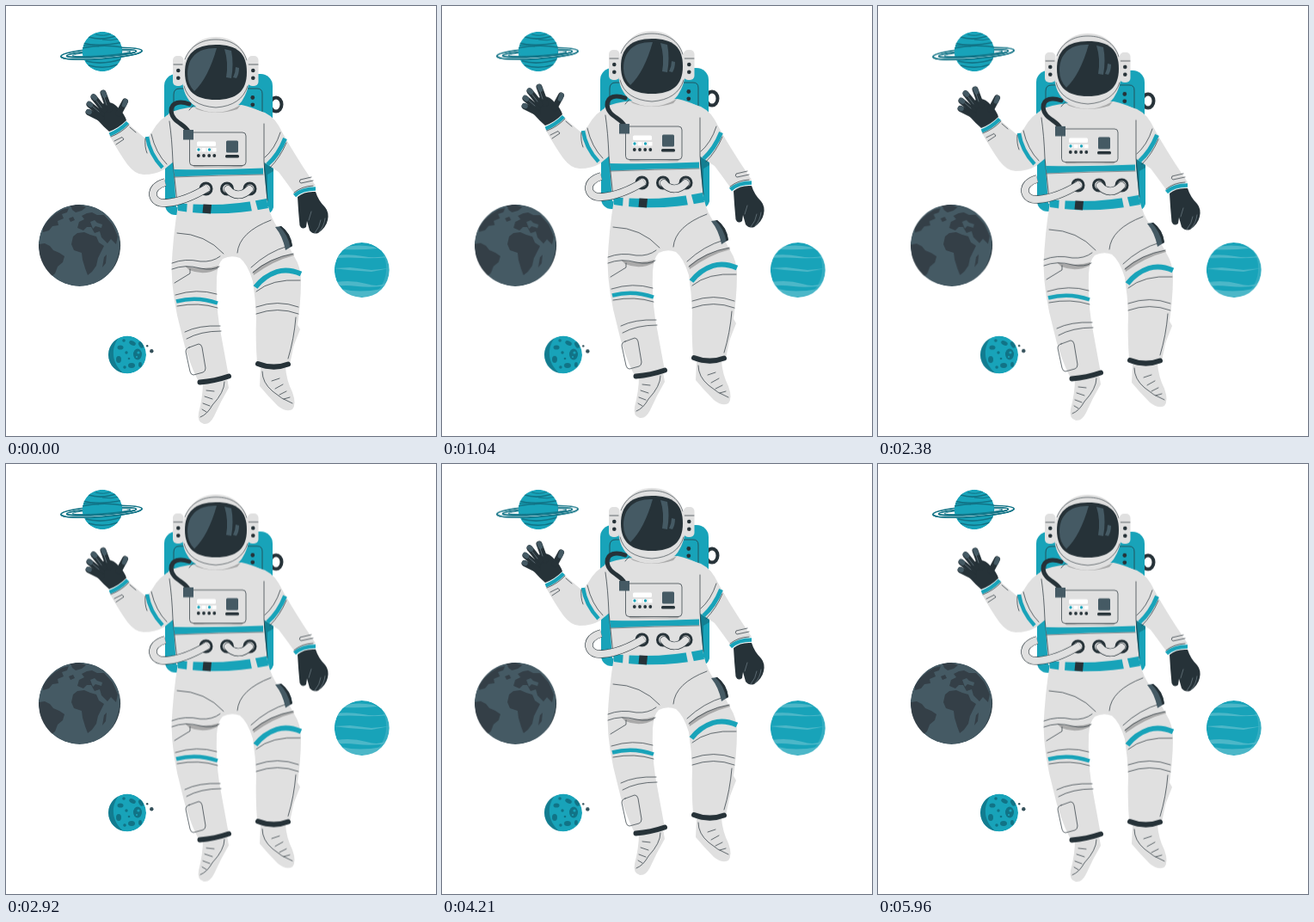
These frames come from a looping animation (500x500 px, 6 s). An HTML page:

```html
<!DOCTYPE html>
<html lang="en">
<head>
<meta charset="utf-8">
<title>Floating astronaut</title>
<style>
  html, body { margin: 0; width: 100%; height: 100%; overflow: hidden; background: #fff; }
  svg { display: block; width: 100%; height: 100%; }
  .float { animation: float 3s linear infinite; }
  .sway { transform-box: fill-box; transform-origin: center; animation: sway 3s ease-in-out infinite; }
  @keyframes float { 50% { transform: translateY(-10px); } }
  @keyframes sway { 25% { transform: rotate(.6deg); } 75% { transform: rotate(-.6deg); } }
  .suit { fill: #e0e0e0; }
  .dark { fill: #263238; }
  .slate { fill: #455a64; }
  .teal { fill: #18a3b9; }
  .deep { fill: #117386; }
  .shade { fill: #a9a9a9; }
  .line, .band, .hose { fill: none; stroke-linecap: round; stroke-linejoin: round; }
  .line { stroke: #263238; stroke-width: .7; }
  .band { stroke: #18a3b9; stroke-width: 4.5; stroke-linecap: butt; }
  .hose { stroke: #263238; stroke-width: 5; }
</style>
</head>
<body>
<svg viewBox="0 0 500 500">
  <defs>
    <clipPath id="ringBall"><circle cx="112" cy="53" r="23.3"/></clipPath>
    <clipPath id="earthBall"><circle cx="85.5" cy="278.3" r="47.6"/></clipPath>
    <clipPath id="gasBall"><circle cx="413.8" cy="307" r="32"/></clipPath>
    <clipPath id="moonBall"><circle cx="141" cy="405.5" r="22"/></clipPath>
    <clipPath id="front"><rect x="-50" y="0" width="100" height="10"/></clipPath>
    <g id="ring" fill="none" stroke="#117386">
      <ellipse rx="47.3" ry="6" stroke-width="1.7"/>
      <ellipse rx="44" ry="4.6" stroke="#fff" stroke-width="1"/>
      <ellipse rx="40.500" ry="3.700" stroke-width="1.800"/>
      <ellipse rx="34" ry="2.400" stroke-width=".8"/>
    </g>
  </defs>

  <!-- ringed planet -->
  <g class="sway">
    <g transform="translate(111 55.300) rotate(-4)"><use href="#ring"/></g>
    <g clip-path="url(#ringBall)">
      <circle class="teal" cx="112" cy="53" r="23.3"/>
      <g fill="none" stroke="#117386" stroke-width="1.600">
        <path d="M96 36Q112 41 130 34M89 43Q108 48 136 42M88 49Q112 44 136 48M93 64Q112 69 134 62M96 69Q114 74 130 68"/>
        <path d="M104 33Q114 36 122 32M90 46Q100 45 108 47M112 39Q122 41 132 38" stroke-width="1"/>
      </g>
      <path d="M130 34Q140 52 128 72L140 70V36Z" fill="#117386" opacity=".35"/>
    </g>
    <g transform="translate(111 55.300) rotate(-4)"><use href="#ring" clip-path="url(#front)"/></g>
  </g>

  <!-- grey globe -->
  <g class="sway" clip-path="url(#earthBall)">
    <circle class="slate" cx="85.5" cy="278.3" r="47.6"/>
    <g fill="#343f47">
      <path d="M38 277L45 276L51 279L55 284L62 287L68 291L66 298L60 303L57 311L50 317L40 306Z"/>
      <path d="M43 258L49 249L57 242L65 237L73 235L71 240L65 242L67 247L60 250L61 255L54 256L50 261L43 263Z"/>
      <path d="M75 232L85 231L93 234L88 238L81 240L77 237Z"/>
      <path d="M78 268L83 264L91 263L98 266L105 268L108 275L114 279L110 287L107 293L105 302L100 309L95 313L92 305L89 295L88 287L79 284L76 277Z"/>
      <path d="M83 258L85 251L91 248L88 244L94 241L100 240L106 243L114 243L124 254L130 268L128 277L122 271L118 276L111 269L109 262L103 264L99 257L94 257L90 261Z"/>
      <path d="M114 292L117 289L116 299L112 304ZM73 247L78 245L80 249L75 251Z"/>
    </g>
    <path class="slate" d="M98 251L103 249L106 252L112 254L111 258L104 256L101 259Z"/>
    <path class="dark" d="M118 238C139 261 138 299 109 323L136 326V235Z" opacity=".75"/>
  </g>

  <!-- banded planet -->
  <g class="sway" clip-path="url(#gasBall)">
    <circle class="teal" cx="413.8" cy="307" r="32"/>
    <g fill="#4cb7c8">
      <path d="M382 290Q400 288 415 291T446 290V292Q427 294 413 293T382 293Z"/>
      <path d="M381 305L400 304L425 307L446 305L425 309L398 307Z"/>
      <path d="M384 321Q402 318 419 323T444 320V325Q425 328 409 326T384 326Z"/>
      <path d="M394 280Q411 277 427 280L432 282Q412 284 391 283ZM390 329Q411 334 437 329L428 337Q410 341 395 335Z"/>
      <path d="M432 278C447 295 446 322 426 337L448 339V278Z" opacity=".55"/>
    </g>
  </g>

  <!-- small moon -->
  <g class="sway">
    <g clip-path="url(#moonBall)">
      <circle class="teal" cx="141" cy="405.5" r="22"/>
      <path class="deep" d="M133 383C121 397 122 416 138 428L116 429V383Z" opacity=".8"/>
      <g class="deep">
        <ellipse cx="153" cy="405" rx="5" ry="6.5"/>
        <ellipse cx="147" cy="392" rx="4" ry="2.5" transform="rotate(25 147 392)"/>
        <ellipse cx="157" cy="394" rx="2.5" ry="4" transform="rotate(-30 157 394)"/>
        <ellipse cx="133" cy="397" rx="3.5" ry="2.6"/>
        <ellipse cx="131" cy="411" rx="3" ry="4"/>
        <ellipse cx="146" cy="418" rx="4" ry="3"/>
        <ellipse cx="156" cy="417" rx="2" ry="3"/>
        <circle cx="140" cy="403" r="1.7"/><circle cx="137" cy="389" r="1.8"/>
        <circle cx="138" cy="420" r="1.8"/><circle cx="143" cy="410" r="1.3"/>
      </g>
      <g class="teal"><circle cx="154" cy="403" r="1.600"/><circle cx="152" cy="408" r="1.1"/></g>
    </g>
    <g fill="#34505a"><circle cx="164.2" cy="395.3" r="1.2"/><circle cx="169.3" cy="401.3" r="2.2"/></g>
  </g>

  <g class="float">
    <!-- backpack -->
    <ellipse class="hose" cx="314" cy="114.5" rx="6.500" ry="8" style="stroke-width:4"/>
    <rect class="teal" x="184" y="79" width="126" height="90" rx="14"/>
    <rect class="teal" x="185" y="140" width="126" height="103" rx="12"/>
    <path class="line" d="M195 130V103Q195 96 202 96H220M272 96H292Q298 96 298 102V124"/>
    <path d="M299 165L311 190V231Q311 238 305 241L299 226Z" fill="#117386" opacity=".75"/>
    <path class="teal" d="M304 196L311 192V232Q311 239 304 242Z"/>
    <circle class="dark" cx="286.8" cy="106.5" r="2.4"/><circle class="dark" cx="286.8" cy="114.8" r="2.4"/>

    <!-- raised arm -->
    <path class="suit" d="M194 123Q178 131 170 146Q167 151 163 155L142 137L120 150Q131 170 141 184Q150 196 160 196Q174 196 184 190L196 180Z"/>
    <path class="band" d="M164 152Q167 172 182 188"/>
    <path class="line" d="M162 154Q161 164 164 171M169 149Q174 171 187 184M126 157L135 152.5L137 155L128 161M144 141L151 147"/>
    <path class="band" d="M120.500 149.500Q132 145 141.500 135.500"/>
    <path class="line" d="M122 152Q135 147 143 138"/>
    <path class="dark" d="M120 146Q113 140 106 132Q102 123 112 114Q122 108 131 119Q138 126 140 133Q131 142 120 146Z"/>
    <g class="hose" style="stroke-width:7">
      <path d="M131 125L138.500 111"/><path d="M120 120L113 101"/><path d="M114 121L102 106"/><path d="M111 126L97 114.500"/><path d="M111 131L96 123.500"/>
    </g>
    <g class="hose" style="stroke:#455a64;stroke-width:5.5">
      <path d="M137.500 115L139 110.500"/><path d="M114.500 104L113 100.500"/><path d="M103.500 107L101.500 105"/><path d="M98.500 115L96.500 113.500"/><path d="M97 123.500L95.500 122.800"/>
    </g>
    <path class="line" d="M117 115L114 106M111 118L105 110M108 123L101 117" style="stroke:#71828a"/>

    <!-- lowered arm -->
    <path class="suit" d="M292 121Q309 125 317 139Q328 160 346 188L360 209Q350 211 336 219Q326 205 317 193L299 181Z"/>
    <path class="band" d="M324.5 154Q317 173 304 184.5" style="stroke-width:5"/>
    <path class="line" d="M319 147Q313 166 300 177M326 159Q319 176 307 188M355 199L342 202Q340 205 343 206L357 203"/>
    <path class="dark" d="M339 222Q347 215 360 216Q363 226 371 234Q376 240 374 249Q372 258 363 264Q357 266 353 261L350 250L349 257Q344 261 341.500 255Q340 240 339 222Z"/>
    <path class="line" d="M359 264Q365 257 366 249M364 263Q370 256 371 247M352 249L355 239" style="stroke:#71828a"/>
    <path class="band" d="M335.500 220.500Q344 212.500 360 212.500"/>
    <path class="line" d="M335 217Q344 209.500 357 209"/>

    <!-- feet -->
    <path class="suit" d="M229 437L257 432L259 444Q250 459 242 477Q237 487 230 486Q222 484 224 473Q229 454 229 437Z"/>
    <path class="line" d="M254 437Q254 449 240 464Q234 475 226 478M233 447L242 448M231 454L240 457M229 462L237 465M228 469L233 472"/>
    <path class="suit" d="M296 421L325 420Q326 435 333 449Q338 463 333 469Q326 473 316 465Q304 453 295 442Z"/>
    <path class="line" d="M298 425Q298 438 310 448Q320 457 333 462M318 433L309 436M322 440L313 445M326 448L318 452M330 455L323 457"/>

    <!-- legs -->
    <path class="suit" d="M334 362L342 376L329 409L326 390Z"/>
    <path class="suit" d="M200 232L305 233Q308 246 316 258Q327 276 335 291Q343 304 343 318Q343 350 337 382L330 417Q310 421 292 415Q290 390 291 362Q290 340 287 320Q281 300 272 293Q262 289 252 294Q246 300 245 316Q244 344 248 371L259 431Q242 438 224 437Q211 412 204 380Q193 340 192.500 305Q194 268 200 232Z"/>
    <path class="shade" d="M208 302Q228 308 247 302L246 306Q230 314 213 307ZM287 309Q306 293 334 288L335 290Q311 296 288 313Z"/>
    <g class="line">
      <path d="M199 264Q232 265 253 288M269 287Q271 263 308 249"/>
      <path d="M193 299Q208 293 226 297Q240 298 249 291M193 306Q208 300 226 305Q240 308 248 303M196 322L214 311V306"/>
      <path d="M285 304Q304 286 328 279M287 310Q306 293 334 288M291 332Q309 317 342 319"/>
      <path d="M197 336Q222 328 245 335M199 349Q224 344 246 351"/>
      <path d="M208 379Q224 371 249 372M210 387Q226 378 250 378"/>
      <path d="M291 350Q316 341 340 350M291 358Q316 349 340 358"/>
      <path d="M337 362Q335 387 328 410"/>
      <path d="M213 397L224 393Q227 393 228 397L232 421Q232 425 229 426L218 429Q215 429 214 425L209 402Q209 398 213 397Z"/>
    </g>
    <path class="band" d="M198 343.500Q222 337 246 345.500"/>
    <path class="band" d="M290 327Q300 314 315 309Q328 305 343 311.500" style="stroke-width:6"/>
    <path class="hose" d="M225.500 437.500Q243 436 259 430.500" style="stroke-width:6"/>
    <path class="hose" d="M293 416Q311 423 328 416.500" style="stroke-width:6"/>

    <!-- thigh pouch -->
    <path class="slate" d="M313 257L320 256Q331 264 333 279L325 284Q322 268 313 257Z"/>
    <path class="dark" d="M318 256.300L320 256Q331 264 333 279L330.500 280.500Q328 266 318 256.300Z"/>

    <!-- torso -->
    <path class="suit" d="M222 117Q200 119 189 125L192 160L195 192L198 234Q250 242 304 230L300 190L302 150L307 131Q299 121 274 115Z"/>
    <path class="line" d="M190 134Q193 154 194 181L199 229M300 137V181L304 226M213 121Q218 114 224 114"/>
    <path class="shade" d="M217 116Q244 132 273 115L269 120Q244 128 222 120Z"/>
    <path class="teal" d="M195 190Q247 191 299 188.500V195.500Q247 196 196 198.500Z"/>
    <path class="line" d="M196 199Q247 197 299 196" style="stroke-width:.5"/>
    <path class="teal" d="M199 229Q250 235 303 224L305 235Q250 246 200 238Z"/>
    <path class="suit" d="M211 225H218L217 241H210ZM283 224L289 223L293 238L286 239Z"/>
    <path class="dark" d="M229.500 230.500L239 231L238 241.500L228.500 240.500Z"/>

    <!-- chest panel -->
    <path class="shade" d="M216 185Q247 188 277 185L274 187.500H219Z"/>
    <rect class="suit" x="213.500" y="147" width="65.500" height="38.500" rx="4"/>
    <rect class="line" x="213.500" y="147" width="65.500" height="38.500" rx="4"/>
    <g fill="#fff">
      <rect x="222" y="157.500" width="22" height="5.500" rx="1.500"/>
      <rect x="221.500" y="165" width="5" height="4.500"/><rect x="227.500" y="165" width="5" height="4.500"/>
      <rect x="233.500" y="165" width="5" height="4.500"/><rect x="239.500" y="165" width="5" height="4.500"/>
    </g>
    <g class="teal"><circle cx="224" cy="167" r="1.700"/><circle cx="236.500" cy="167" r="1.700"/></g>
    <g class="dark">
      <circle cx="223.800" cy="174" r="1.900"/><circle cx="230" cy="174" r="1.900"/>
      <circle cx="236.200" cy="174" r="1.900"/><circle cx="242.300" cy="174" r="1.900"/>
      <rect x="255" y="173" width="16" height="3.600" rx="1.500"/>
    </g>
    <rect class="slate" x="256" y="156.500" width="14" height="14" rx="1.500"/>

    <!-- waist tubes -->
    <g class="hose">
      <circle cx="232.500" cy="212.500" r="6.500" style="stroke-width:3"/>
      <circle cx="257" cy="212.500" r="6.500" style="stroke-width:3"/>
      <circle cx="283.500" cy="212.500" r="6.500" style="stroke-width:3"/>
      <g style="stroke-width:9.500">
        <path id="longTube" stroke-linecap="butt" d="M235 211C217 222 202 228 186 229C172 230 167 219 174 211C177 208 181 206 185 205"/>
        <path id="shortTube" d="M258 213C265 222 276 221 283 213"/>
      </g>
      <g style="stroke:#e0e0e0;stroke-width:8.200">
        <use href="#longTube"/><use href="#shortTube"/>
      </g>
    </g>

    <!-- helmet -->
    <rect class="suit" x="194" y="58" width="12.500" height="35" rx="5"/>
    <rect class="suit" x="281" y="58" width="12.500" height="35" rx="5"/>
    <path class="line" d="M195 68H205M282 68H293"/>
    <g class="dark">
      <circle cx="200.300" cy="75" r="2.300"/><circle cx="200.300" cy="83.800" r="2.300"/>
      <circle cx="287.300" cy="75" r="2.300"/><circle cx="287.300" cy="83.800" r="2.300"/>
    </g>
    <path class="suit" d="M244 36C268 36 281 53 283 77C284 92 279 103 274 111Q266 122 244 122Q222 122 213 110C207 102 204 91 205 77C207 53 221 36 244 36Z"/>
    <path class="line" d="M208 62C214 46 228 39 244 39C262 39 275 47 280 63M207 93Q213 116 244 118Q274 116 281 93" style="stroke-width:.6"/>
    <path class="dark" d="M244 45C269 45 280 55 280 77C280 99 268 109 244 109C220 109 208 99 208 77C208 56 220 45 244 45Z"/>
    <path class="slate" d="M245 49C224 48 211 59 211 79Q211 91 219 99Q235 84 245 49Z"/>
    <path class="slate" d="M254 50L262 52Q265 67 262 84L256 83Q259 66 254 50ZM267 71L271 72Q271 79 268 84L264 83Q267 77 267 71Z"/>

    <!-- air hose -->
    <path class="hose" d="M212 146C208 137 193 135 192 122C192 112 202 110 213 114"/>
    <rect class="slate" x="206" y="144" width="12" height="11.500"/>
  </g>
</svg>
</body>
</html>
```
